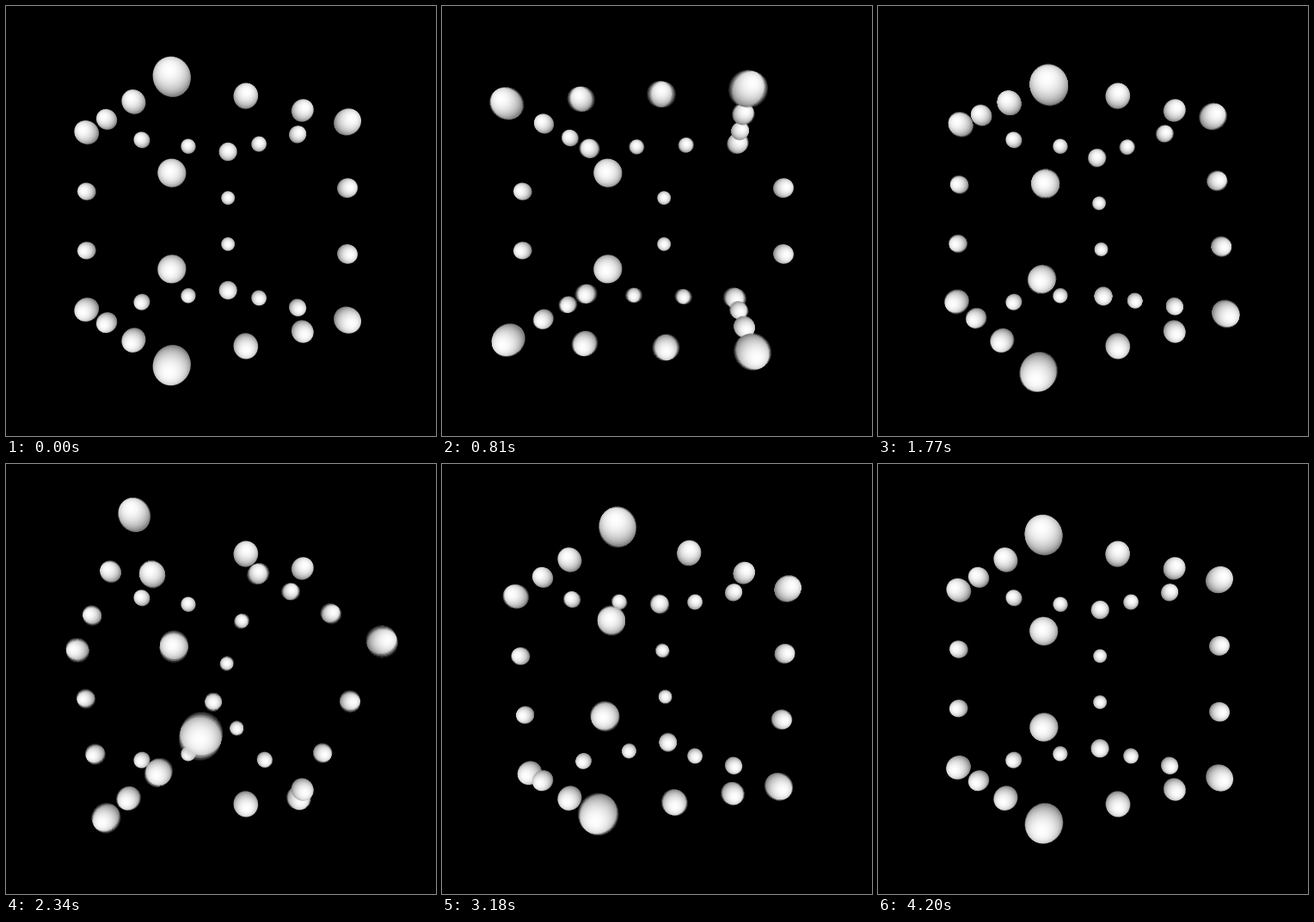
Animation of 500 by 500 pixels, one loop 4.23 s. Source, as an HTML page with a canvas:

```html
<!DOCTYPE html>
<html lang="en">
<head>
<meta charset="utf-8">
<title>Twisting cube of spheres</title>
<style>
  html, body { margin: 0; width: 100%; height: 100%; overflow: hidden; background: #000; }
  canvas { display: block; width: 100vw; height: 100vh; }
</style>
</head>
<body>
<canvas id="stage" width="500" height="500"></canvas>
<script>
const SIZE = 500, MID = SIZE / 2;
const FOCAL = MID / Math.tan(Math.PI / 6);
const CORNER_RADIUS = 0.131, EDGE_RADIUS = CORNER_RADIUS * 0.75;
const SHIFT_X = -0.12, DEPTH = 3.985, YAW = Math.PI / 5;
const FRAME_MS = 30, PHASE_FRAMES = 47, HOLD_FRAMES = 7, PHASES = 3;
const SAMPLES = 8, SHUTTER = 0.6;

const ctx = document.getElementById('stage').getContext('2d');
const image = ctx.createImageData(SIZE, SIZE);
const pixels = new Uint32Array(image.data.buffer);
const sample = new Uint8Array(SIZE * SIZE);
const total = new Uint16Array(SIZE * SIZE);

// Corners and edge thirds of a cube, as [along, across, up]
const steps = [-1, -1 / 3, 1 / 3, 1];
const extremes = p => p.filter(c => Math.abs(c) === 1).length;
const points = steps.flatMap(u => steps.flatMap(v => steps.map(y => [u, v, y])))
  .filter(p => extremes(p) >= 2);

const smooth = p => p * p * (3 - 2 * p);

// Opposite faces turn a quarter in opposite directions
function twist(point, axis, angle) {
  const p = point.slice();
  if (Math.abs(p[axis]) !== 1) return p;
  const a = (axis + 1) % 3, b = (axis + 2) % 3;
  const c = Math.cos(angle), s = Math.sin(angle) * p[axis];
  p[a] = c * point[a] + s * point[b];
  p[b] = c * point[b] - s * point[a];
  return p;
}

function toCamera([u, v, y]) {
  const c = Math.cos(YAW), s = Math.sin(YAW);
  return { x: SHIFT_X + u * c - v * s, y: -y, z: DEPTH + u * s + v * c };
}

function spheresAt(frame) {
  const phase = Math.floor(frame / PHASE_FRAMES) % PHASES;
  const local = frame % PHASE_FRAMES;
  const progress = Math.max(0, (local - HOLD_FRAMES) / (PHASE_FRAMES - HOLD_FRAMES));
  const angle = smooth(progress) * Math.PI / 2;
  return points.map(p => ({
    ...toCamera(twist(p, (phase + 2) % 3, angle)),
    radius: extremes(p) === 3 ? CORNER_RADIUS : EDGE_RADIUS
  })).sort((a, b) => b.z - a.z);
}

// Ray-cast one sphere, lit from the viewing direction over a half-bright ambient
function drawSphere({ x, y, z, radius }, jx, jy) {
  const zz = z * z - radius * radius;
  const c = x * x + y * y + zz;
  const cx = MID + FOCAL * x * z / zz, cy = MID + FOCAL * y * z / zz;
  const reach = FOCAL * radius * Math.sqrt(c) / zz + 1;
  const left = Math.max(0, Math.floor(cx - reach)), right = Math.min(SIZE - 1, Math.ceil(cx + reach));
  const top = Math.max(0, Math.floor(cy - reach)), bottom = Math.min(SIZE - 1, Math.ceil(cy + reach));
  for (let py = top; py <= bottom; py++) {
    const dy = (py + jy - MID) / FOCAL;
    for (let px = left; px <= right; px++) {
      const dx = (px + jx - MID) / FOCAL;
      const a = dx * dx + dy * dy + 1, b = dx * x + dy * y + z;
      const disc = b * b - a * c;
      if (disc < 0) continue;
      const facing = (z - (b - Math.sqrt(disc)) / a) / radius;
      sample[py * SIZE + px] = 128 + 127 * Math.max(0, facing);
    }
  }
}

function render(frame) {
  total.fill(0);
  for (let i = 0; i < SAMPLES; i++) {
    sample.fill(0);
    const jx = (i + 0.5) / SAMPLES, jy = ((i * 3) % SAMPLES + 0.5) / SAMPLES;
    for (const sphere of spheresAt(frame + SHUTTER * jx)) drawSphere(sphere, jx, jy);
    for (let k = 0; k < total.length; k++) total[k] += sample[k];
  }
  for (let k = 0; k < total.length; k++) {
    pixels[k] = 0xff000000 | Math.round(total[k] / SAMPLES) * 0x010101;
  }
  ctx.putImageData(image, 0, 0);
}

const start = performance.now();
let shown = -1;

function tick() {
  const elapsed = performance.now() - start;
  const frame = Math.floor(elapsed / FRAME_MS) % (PHASE_FRAMES * PHASES);
  if (frame !== shown) render(shown = frame);
  requestAnimationFrame(tick);
}
tick();
</script>
</body>
</html>
```
